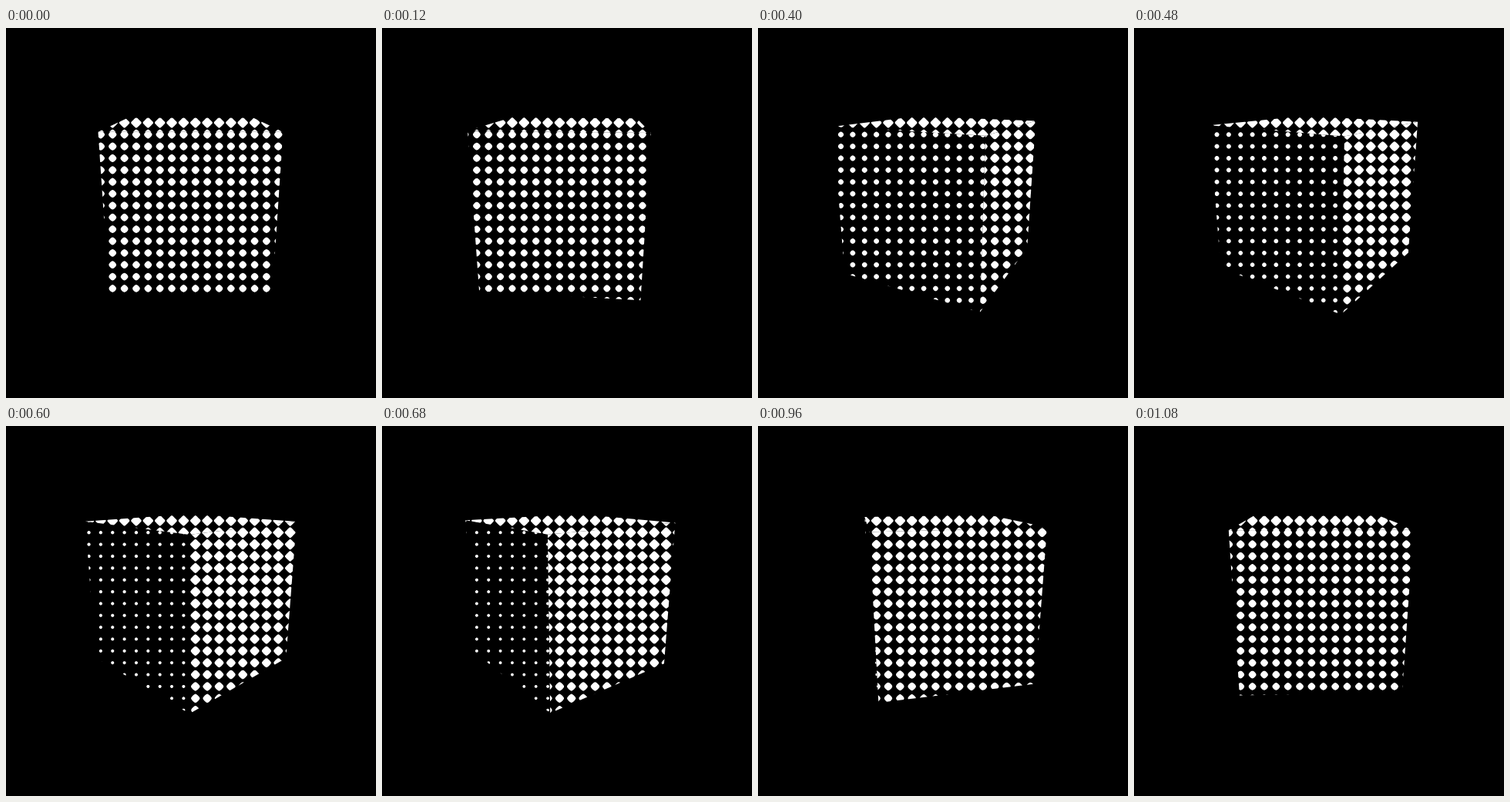
An HTML page with a canvas for the animation above (1.12 s loop, 480 by 480 pixels).

```html
<!DOCTYPE html>
<html lang="en">
<head>
<meta charset="utf-8">
<title>Halftone cube</title>
<style>
  html, body { margin: 0; height: 100%; overflow: hidden; background: #000; }
  canvas { display: block; }
</style>
</head>
<body>
<canvas width="480" height="480"></canvas>
<script>
const ctx = document.querySelector('canvas').getContext('2d');
const LOOP = 1120, STEP = 40, PITCH = 15.36;
const CX = 239.5, CY = 217, FOCAL = 484, DISTANCE = 5.27;
const TILT = 16 * Math.PI / 180, SIN = Math.sin(TILT), COS = Math.cos(TILT);

// Step number -> cube angle: a quarter turn, gentle at both ends.
const TURN = [[0, 0], [3, 6], [7, 18], [10, 27.5], [15, 45.5], [20, 63], [27, 88], [28, 90]];
// Direction a side faces -> radius of its dots.
const SHADE = [[-90, 1.5], [-63, 1.8], [-45, 2.1], [-27.5, 3.5], [-18, 4.2], [0, 5],
  [27, 6.2], [45, 6.4], [62, 5.5], [72, 4.8], [90, 3.5]];
const TOP_RADIUS = 6.8;

const rad = deg => deg * Math.PI / 180;

function lerpKeys(keys, x) {
  const i = Math.max(1, keys.findIndex(k => k[0] >= x));
  const [x0, y0] = keys[i - 1], [x1, y1] = keys[i];
  return y0 + (y1 - y0) * (x - x0) / (x1 - x0);
}

// Screen position of the cube corner at the given yaw and height (1 or -1).
function corner(yaw, y) {
  const x = Math.SQRT2 * Math.sin(rad(yaw)), z = Math.SQRT2 * Math.cos(rad(yaw));
  const scale = FOCAL / (DISTANCE - y * SIN - z * COS);
  return [CX + x * scale, CY - (y * COS - z * SIN) * scale];
}

// Outline of cos(a) + cos(b) = const: round when small, a diamond when large.
function addDot(x, y, r) {
  const unit = PITCH / (2 * Math.PI), level = 1 + Math.cos(r / unit);
  const n = 8;
  for (let i = 0; i < 4 * n; i++) {
    const t = i * Math.PI / (2 * n);
    const a = r / unit * Math.cos(t);
    const b = Math.acos(Math.max(-1, Math.min(1, level - Math.cos(a))));
    const px = x + a * unit, py = y + Math.sign(Math.sin(t)) * b * unit;
    i ? ctx.lineTo(px, py) : ctx.moveTo(px, py);
  }
  ctx.closePath();
}

function drawFace(points, radiusAt) {
  ctx.save();
  ctx.beginPath();
  points.forEach(p => ctx.lineTo(...p));
  ctx.clip();
  ctx.beginPath();
  for (let row = 7; row < 25; row++)
    for (let col = 6; col < 26; col++)
      addDot(col * PITCH, row * PITCH, radiusAt(row * PITCH));
  ctx.fill();
  ctx.restore();
}

function drawSide(yaw) {
  if (Math.cos(rad(yaw)) < 0.2) return;
  const base = lerpKeys(SHADE, yaw);
  const falloff = 0.04 + 0.1 * Math.max(0, Math.sin(rad(yaw)));
  const points = [corner(yaw - 45, 1), corner(yaw + 45, 1), corner(yaw + 45, -1), corner(yaw - 45, -1)];
  drawFace(points, y => Math.min(7.1, base * (1 + falloff * (240 - y) / 110)));
}

function draw(now) {
  const angle = lerpKeys(TURN, Math.floor(now % LOOP / STEP));
  ctx.fillStyle = '#000';
  ctx.fillRect(0, 0, 480, 480);
  ctx.fillStyle = '#fff';
  drawFace([45, 135, 225, 315].map(a => corner(a - angle, 1)), () => TOP_RADIUS);
  drawSide(-angle);
  drawSide(90 - angle);
}

let start;
function tick(now) {
  start ??= now;
  draw(now - start);
  requestAnimationFrame(tick);
}
requestAnimationFrame(tick);
</script>
</body>
</html>
```
